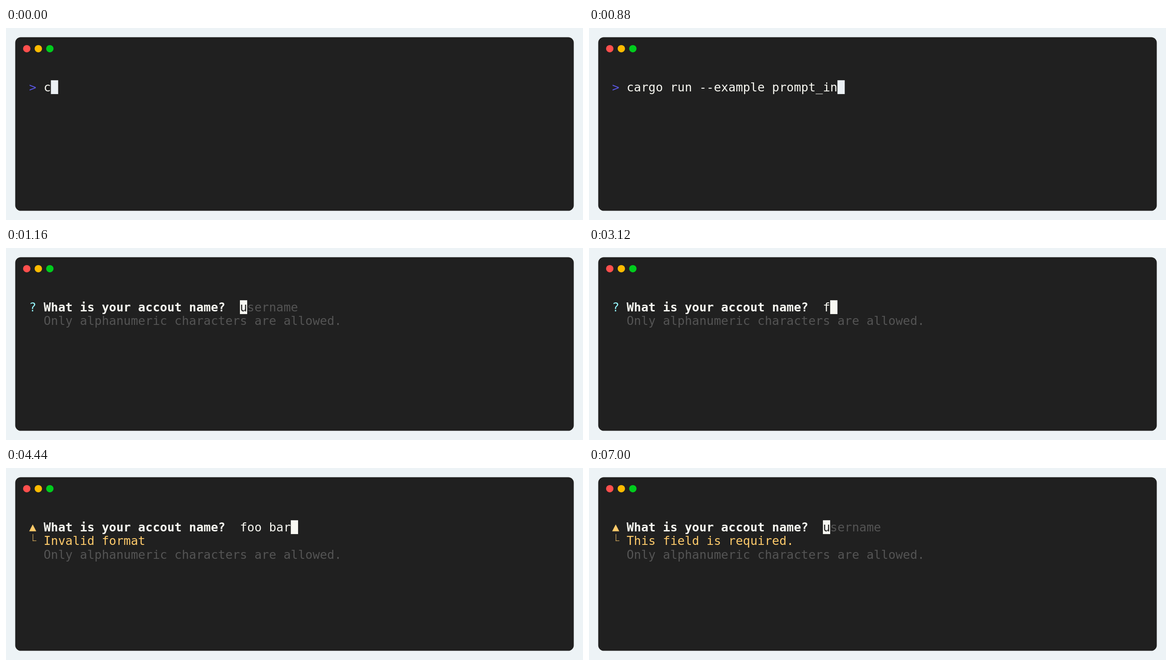
Recreate the animation shown at these times as an HTML page with a canvas. Size 1280 px wide and 427 px high, loop 8000 ms.

```html
<!DOCTYPE html>
<html lang="en">
<head>
<meta charset="utf-8">
<title>Terminal prompt</title>
<style>
  html, body { margin: 0; height: 100%; overflow: hidden; background: #edf3f6; }
  canvas { display: block; }
</style>
</head>
<body>
<canvas width="1280" height="427"></canvas>
<script>
const ctx = document.querySelector('canvas').getContext('2d');
const SCALE = 1.024, CELL = 15.75, LINE = 30, LEFT = 50, TOP = 113.5;
const FONT = '26px "DejaVu Sans Mono", monospace';
const LOOP = 8000, TICK = 40;

const BG = '#202020', FG = '#f8f8f2', GRAY = '#545454', YELLOW = '#ffcb6b',
      GREEN = '#c3e88d', CYAN = '#95f5fb', VIOLET = '#5a56e0', CURSOR = '#ebf0f4';

const COMMAND = 'cargo run --example prompt_input';
const QUESTION = 'What is your accout name?';
const HINT = 'Only alphanumeric characters are allowed.';
const INPUT_COL = 2 + QUESTION.length + 2;

const x = col => LEFT + col * CELL;
const y = row => TOP + row * LINE;

// Every character sits in its own terminal cell.
function text(str, col, row, color = FG, bold = false) {
  ctx.font = (bold ? 'bold ' : '') + FONT;
  ctx.fillStyle = color;
  [...str].forEach((ch, i) => ctx.fillText(ch, x(col + i), y(row) + 23.8));
}

function block(col, row, color) {
  ctx.fillStyle = color;
  ctx.fillRect(x(col), y(row), CELL, LINE);
}

function windowFrame() {
  ctx.fillStyle = '#edf3f6';
  ctx.fillRect(0, 0, 1250, 417);
  ctx.fillStyle = BG;
  ctx.beginPath();
  ctx.roundRect(20, 20, 1210, 377, 12);
  ctx.fill();
  ['#ff4f4d', '#febb00', '#00cc1d'].forEach((color, i) => {
    ctx.fillStyle = color;
    ctx.beginPath();
    ctx.arc(45 + 25 * i, 45, 8, 0, 7);
    ctx.fill();
  });
}

function shell(t) {
  const typed = Math.floor(1.5 + t / 31.4);
  text('>', 0, 0, VIOLET);
  text(COMMAND.slice(0, typed), 2, 0);
  if (t < 1000) return block(2 + Math.min(typed, COMMAND.length), 0, CURSOR);
  if (t < 1080) return block(0, 1, CURSOR);
  text('Finished', 4, 1, GREEN, true);
  text('dev [unoptimized + debuginfo] target(s) in 0.03s', 13, 1);
  text('Running', 5, 2, GREEN, true);
  text('`target/debug/examples/prompt_input`', 13, 2);
  block(0, 3, CURSOR);
}

function errorMarks() {
  ctx.fillStyle = YELLOW;
  ctx.beginPath();
  ctx.moveTo(x(0) + 0.2, y(0) + 24);
  ctx.lineTo(x(0.5), y(0) + 9);
  ctx.lineTo(x(1) - 0.2, y(0) + 24);
  ctx.fill();
  ctx.fillRect(x(0.5), y(1), 1, 15);
  ctx.fillRect(x(0.5), y(1) + 14, CELL / 2, 1);
}

function prompt(value, error) {
  if (error) {
    errorMarks();
    text(error, 2, 1, YELLOW);
  } else {
    text('?', 0, 0, CYAN);
  }
  text(QUESTION, 2, 0, FG, true);
  text(value, INPUT_COL, 0);
  block(INPUT_COL + value.length, 0, FG);
  if (!value) {
    text('u', INPUT_COL, 0, BG);
    text('sername', INPUT_COL + 1, 0, GRAY);
  }
  text(HINT, 2, error ? 2 : 1, GRAY);
}

function draw(t) {
  windowFrame();
  if (t < 1160) shell(t);
  else if (t < 3120) prompt('');
  else if (t < 4440) prompt('foo bar'.slice(0, 1 + Math.floor((t - 3120) / 92)));
  else if (t < 6560) prompt('foo bar', 'Invalid format');
  else if (t < 6600) return;
  else if (t < 6640) prompt('foo');
  else if (t < 7000) prompt('');
  else prompt('', 'This field is required.');
}

ctx.scale(SCALE, SCALE);
const start = performance.now();
function frame() {
  const t = (performance.now() - start) % LOOP;
  draw(Math.floor(t / TICK) * TICK);
  requestAnimationFrame(frame);
}
frame();
</script>
</body>
</html>
```
